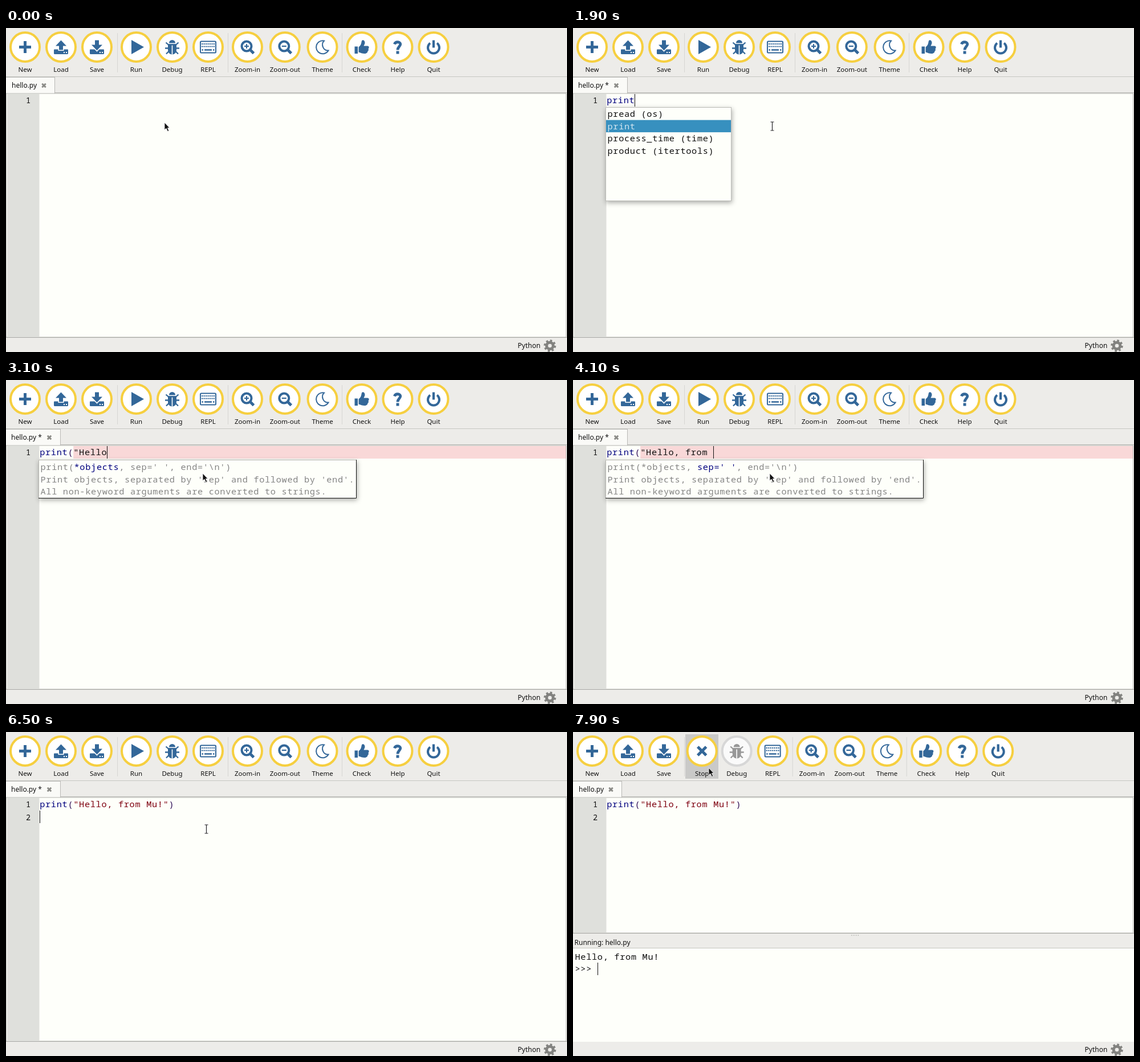
Write an HTML page that moves like this. It is 984x569 px and loops after 8 s.

```html
<!DOCTYPE html>
<html lang="en">
<head>
<meta charset="utf-8">
<title>Code editor</title>
<style>
  html, body { margin: 0; width: 100%; height: 100%; overflow: hidden; background: #edece9; }
  svg { display: block; width: 984px; height: 569px; }
  text { white-space: pre; fill: #111; font: 12px "Noto Sans", sans-serif; }
  .label { font-size: 11.5px; text-anchor: middle; }
  .code { font: 15.3px "Noto Sans Mono", monospace; letter-spacing: .66px; }
  .num { font: 13.5px "Noto Sans Mono", monospace; text-anchor: end; }
  .tip text { fill: #858585; }
  .navy { fill: #00007f; }
  .paper { fill: #fefffa; }
  .float { filter: drop-shadow(1px 3px 4px #0005); }
  .icon { fill: #336799; stroke: #336799; stroke-width: 0; }
  .icon .line { fill: none; stroke-width: 2; }
  .icon .gap { fill: none; stroke: #fff; }
  .ring { fill: #fff; stroke: #f6cf40; stroke-width: 4; }
  .off .ring { fill: #fafafa; stroke: #d7d7d7; }
  .off .icon { fill: #989898; stroke: #989898; }
</style>
</head>
<body>
<svg viewBox="0 0 984 569">
  <rect width="984" height="569" fill="#edece9"/>
  <rect id="hover" x="197" y="4" height="78" fill="#c9c9c8"/>
  <g id="bar"></g>

  <path d="M0 85.5H984" stroke="#c6c6c2"/>
  <path d="M0 113.5H984" stroke="#b9b9b5"/>
  <rect id="tab" x="-.5" y="86.5" height="29" fill="#fafaf7" stroke="#b9b9b5"/>
  <text id="name" y="105"></text>
  <path id="close" d="M-3.2-3.2 3.2 3.2M3.2-3.2-3.2 3.2" stroke="#8b8b87" stroke-width="3"/>

  <rect id="page" class="paper" x=".5" y="115" width="982" stroke="#b4b4b0"/>
  <rect id="gutter" x="2" y="116" width="56.5" fill="#dfe0dc"/>
  <rect id="pink" x="118.2" y="116" width="863.8" height="22" fill="#f9d8d8"/>
  <text class="num" x="43" y="132">1</text>
  <text class="num" x="43" y="154.500" id="two">2</text>
  <text class="code" id="code" x="59.200" y="132"></text>

  <g id="list">
    <rect class="paper float" x="57.5" y="139.500" width="220" height="164" stroke="#bcbcb8"/>
    <rect id="pick" x="58" width="219" height="21.500" fill="#3790bf"/>
  </g>

  <g id="tip" class="tip">
    <rect class="paper float" x="57" y="140" width="558" height="68"/>
    <path d="M57.5 207V140.500H615" fill="none" stroke="#b5b5b0"/>
    <path d="M57 207.500H614.500V140" fill="none" stroke="#111"/>
    <text class="code" id="args" x="60.500" y="158"></text>
    <text class="code" x="60.500" y="179.500">Print objects, separated by 'sep' and followed by 'end'.</text>
    <text class="code" x="60.500" y="201">All non-keyword arguments are converted to strings.</text>
  </g>

  <g id="pane">
    <path d="M0 353.500H984" stroke="#a9a9a5"/>
    <path d="M488 357H501" stroke="#b5b5b1" stroke-width="2" stroke-dasharray="1 2"/>
    <text x="2.500" y="374">Running: hello.py</text>
    <rect class="paper" y="380" width="984" height="164"/>
    <path d="M0 379.500H984" stroke="#c6c6c2"/>
    <g id="out">
      <text class="code" x="3.500" y="400">Hello, from Mu!</text>
      <text class="code" x="3.500" y="421">&gt;&gt;&gt; </text>
    </g>
  </g>

  <path id="caret" d="M.5 0V22" stroke="#111"/>
  <path id="base" d="M0 543.500H984" stroke="#a9a9a5"/>
  <text x="897.500" y="562">Python</text>
  <g transform="translate(954 558)" fill="none" stroke="#82827f">
    <circle r="5.800" stroke-width="5"/>
    <circle r="9" stroke-width="3.500" stroke-dasharray="3.534"/>
  </g>

  <g id="mouse" stroke-linejoin="round">
    <path id="arrow" d="M0 0V13L3 10.200 5.500 15.500 7.800 14.500 5.400 9.500H9Z" fill="#111" stroke="#fff" stroke-width=".8"/>
    <g id="beam" transform="translate(6.500 6.500)" fill="none">
      <path d="M-3-7.500H3M-3 7.500H3M0-7.500V7.500" stroke="#fff" stroke-width="3"/>
      <path d="M-3-7.500H3M-3 7.500H3M0-7.500V7.500" stroke="#222" stroke-width="1.200"/>
    </g>
  </g>
</svg>
<script>
const $ = id => document.getElementById(id);
const set = (id, attrs) => { for (const k in attrs) $(id).setAttribute(k, attrs[k]); };
const show = (id, on) => set(id, { display: on ? 'inline' : 'none' });
const move = (id, x, y) => set(id, { transform: `translate(${x} ${y})` });
const line = (d, w = 2, cls = 'line') => `<path class="${cls}" d="${d}" style="stroke-width:${w}px"/>`;
const solid = d => `<path d="${d}"/>`;

const plus = solid('M-2.500-10.500H2.500V-2.500H10.500V2.500H2.500V10.500H-2.500V2.500H-10.500V-2.500H-2.500Z');
const tray = solid('M-12.500 5Q-12.500 4-11.500 4H11.500Q12.500 4 12.500 5V11Q12.500 12.500 11 12.500H-11Q-12.500 12.500-12.500 11Z');
const lights = line('M4.500 9.500H6.500M8.500 9.500H10.500', 2, 'gap');
const onTray = d => tray + line(d, 3, 'gap') + solid(d) + lights;
const lens = line('M7 -1.500A8.500 8.500 0 1 1-10-1.500A8.500 8.500 0 1 1 7-1.500Z', 4)
  + line('M4.500 4.500 11 11', 5);
const keys = y => `<path class="line" d="M-11.500 ${y}H11.500" stroke-dasharray="2.300 1.150"/>`;

const icons = {
  New: plus,
  Load: onTray('M0-12 9.500-2H3.500V5H-3.500V-2H-9.500Z'),
  Save: onTray('M-3.500-12H3.500V-4H9.500L0 6-9.500-4H-3.500Z'),
  Run: solid('M-8.500-12.500 13.500 0-8.500 12.500Z'),
  Stop: `<g transform="rotate(45)">${plus}</g>`,
  Debug: line('M-12.500 2H12.500M-11-8-6-3.500M11-8 6-3.500M-10.500 12-5.500 7M10.500 12 5.500 7', 2.3)
    + solid('M-5.500-7A5.500 5.500 0 0 1 5.500-7Z') + solid('M-7.500-5.500H7.500V5A7.500 8 0 0 1-7.500 5Z')
    + line('M0-3V13', 1.6, 'gap'),
  REPL: line('M-12-10H12Q13.500-10 13.500-8.500V8.500Q13.500 10 12 10H-12Q-13.500 10-13.500 8.500V-8.500Q-13.500-10-12-10Z')
    + keys(-5.5) + keys(-1) + line('M-11 5H-8.500M-6.500 5H6.500M8.500 5H11', 2.3),
  'Zoom-in': lens + line('M-5.500-1.500H2.500M-1.500-5.500V2.500', 2.2),
  'Zoom-out': lens + line('M-5.500-1.500H2.500', 2.2),
  Theme: line('M3-11A11.500 11.500 0 1 0 10.500 6A10 10 0 0 1 3-11Z'),
  Check: solid('M-12.500-1H-7V11.500H-12.500Z')
    + solid('M-5.500 0C-1-3-1-7 0-11C2-14 5.500-11 5.500-8C5.500-5 4-4 3.500-2H10C13.500-2 13 2 11.500 3C12.500 5 11.500 7 10.500 7C10.500 9 9 11.500 5 11.500C1 11.500-2 10-5.500 9Z'),
  Help: line('M-5.500-5C-4-10.500 5-9.500 4.800-5C4.500-1 0-.5 0 5', 4.8) + solid('M-2.500 7H2.500V12H-2.500Z'),
  Quit: line('M-6-7A10 10 0 1 0 6-7', 4) + line('M0-12V1', 4.2)
};

function button(name, x, off) {
  return `<g transform="translate(${x} 33.500)" class="${off ? 'off' : ''}">
    <circle class="ring" r="25.500"/><g class="icon">${icons[name]}</g>
    <text class="label" y="43.500">${name}</text></g>`;
}

const rest = { 'Zoom-in': 423.5, 'Zoom-out': 489.3, Theme: 555, Check: 624, Help: 687, Quit: 750 };

function toolbar(running) {
  const dx = running ? -4.3 : 0;
  const rule = x => `<path d="M${x} 9V78" stroke="#d6d6d3"/>`;
  return button('New', 33.5) + button('Load', 96.5) + button('Save', 159.5)
    + (running ? button('Stop', 226.2) : button('Run', 228.5))
    + button('Debug', 291.5 + dx, running) + button('REPL', 354.5 + dx)
    + Object.keys(rest).map(n => button(n, rest[n] + dx)).join('')
    + rule(195.5) + rule(389.5 + dx) + rule(589.5 + dx);
}

const words = ['pread (os)', 'print', 'process_time (time)', 'product (itertools)'];
const rows = words.map((w, i) => `<text class="code" x="60.500" y="${156 + i * 21.6}">${w}</text>`);
$('list').insertAdjacentHTML('beforeend', rows.join(''));
const rowTexts = $('list').querySelectorAll('text');

const source = 'print("Hello, from Mu!")\n';
const keyTimes = [1100, 1200, 1500, 1600, 1800, 2000, 2200, 2500, 2600, 2700, 2900, 3000, 3200,
  3300, 3500, 3600, 3700, 3900, 4000, 4500, 4600, 4900, 5100, 5400, 6100];
const FOCUS = 800, HOVER = 7100, START = 7500, OUTPUT = 7700, LOOP = 8000;

// time, x, y of the pointer tip
const path = [[0, 278, 166], [200, 278, 166], [800, 343, 166], [2400, 343, 166], [2600, 345, 164],
  [6600, 345, 164], [7200, 232, 50], [7500, 232, 50], [7800, 238, 63], [LOOP, 238, 63]];

function pointer(t) {
  const i = path.findIndex(p => p[0] > t);
  const [a, b] = [path[i - 1], path[i]];
  let k = (t - a[0]) / (b[0] - a[0]);
  k = k * k * (3 - 2 * k);
  return [a[1] + (b[1] - a[1]) * k, a[2] + (b[2] - a[2]) * k];
}

const span = (s, fill) => `<tspan fill="${fill}" style="fill:${fill}">${s}</tspan>`;

function codeSpans(n) {
  const s = source.slice(0, n).trimEnd() + (n === 19 || n === 14 ? ' ' : '');
  return span(s.slice(0, 5), n < 5 ? '#111' : '#00007f') + span(s.slice(5, 6), '#301058')
    + span(s.slice(6, 23), n < 23 ? '#111' : '#7f0010') + span(s.slice(23), '#301058');
}

let wasRunning;
function draw(t) {
  const n = keyTimes.filter(k => k <= t).length;
  const running = t >= START, output = t >= OUTPUT;
  const dirty = n > 0 && !running;
  const tip = n >= 6 && n < 24;

  if (running !== wasRunning) $('bar').innerHTML = toolbar(wasRunning = running);
  show('hover', t >= HOVER);
  set('hover', { width: running ? 58 : 63 });

  set('tab', { width: dirty ? 96 : 86 });
  set('name', { x: dirty ? 9 : 10 });
  $('name').textContent = dirty ? 'hello.py *' : 'hello.py';
  move('close', dirty ? 76 : 66.5, 101);

  set('page', { height: running ? 238 : 428 });
  set('gutter', { height: running ? 236 : 427 });
  show('base', !running);
  show('pane', running);
  show('out', output);

  $('code').innerHTML = codeSpans(n);
  show('two', n === 25);
  show('pink', n >= 7 && n < 23);

  const pick = n > 2 ? 1 : 0;
  show('list', n >= 2 && n < 6);
  set('pick', { y: 140 + pick * 21.6 });
  rowTexts.forEach((r, i) => r.style.fill = i === pick ? '#d5e7f1' : '#111');

  show('tip', tip);
  $('args').innerHTML = n < 13
    ? `print(<tspan class="navy">*objects</tspan>, sep=' ', end='\\n')`
    : `print(*objects, <tspan class="navy">sep=' '</tspan>, end='\\n')`;

  const since = output ? OUTPUT : n ? keyTimes[n - 1] : FOCUS;
  const focused = t >= FOCUS && (output || !running);
  show('caret', focused && (t - since) % 1000 < 500);
  if (output) move('caret', 43, 405);
  else if (n === 25) move('caret', 59, 138);
  else move('caret', Math.floor(59.2 + n * 9.84), 116);

  const [x, y] = pointer(t);
  const beam = t > 200 && y > 115 && !tip;
  move('mouse', x, y);
  show('beam', beam);
  show('arrow', !beam);
}

const begin = performance.now();
function tick() {
  const t = (performance.now() - begin) % LOOP;
  draw(Math.floor(t / 100) * 100);
  requestAnimationFrame(tick);
}
tick();
</script>
</body>
</html>
```
